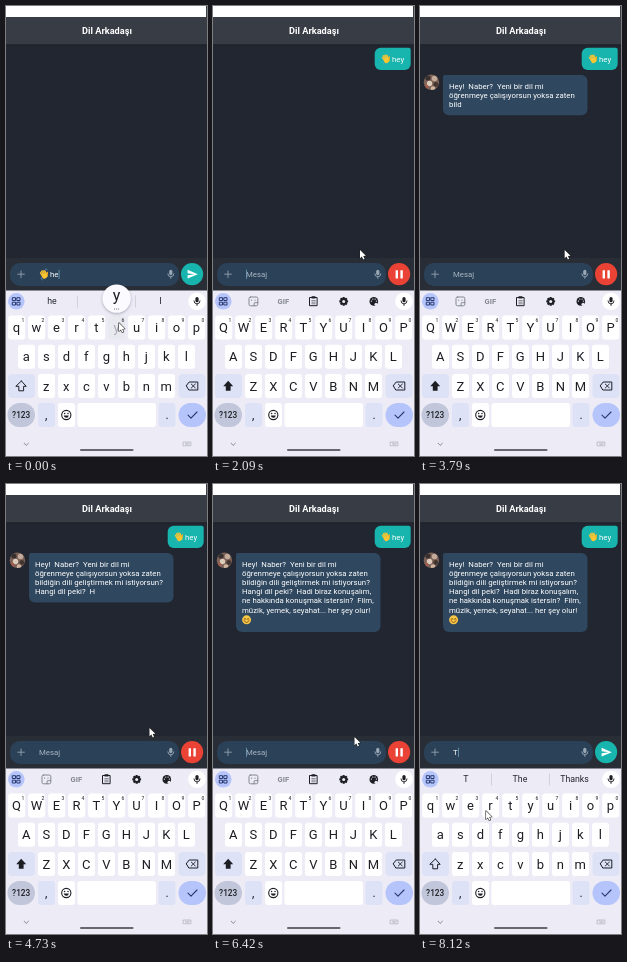
Recreate the animation shown at these times as an HTML page with a canvas. Size 201x450 px, loop 8.18 s.

```html
<!DOCTYPE html>
<html lang="tr">
<head>
<meta charset="utf-8">
<title>Dil Arkadaşı</title>
<style>
  html, body { margin: 0; width: 100%; height: 100%; overflow: hidden; background: #212630; }
  canvas { display: block; width: 201px; height: 450px; }
</style>
</head>
<body>
<canvas id="stage"></canvas>
<script>
const W = 201, H = 450, LOOP = 8180;
const canvas = document.getElementById('stage');
const c = canvas.getContext('2d');
const dpr = window.devicePixelRatio || 1;
canvas.width = Math.round(W * dpr);
canvas.height = Math.round(H * dpr);

const FONT = 'Roboto, "Noto Sans", sans-serif';
const BODY = 7.83, LINE = 9.17;
const TEAL = '#17b5ad', RED = '#ea4335', INK = '#1d1e24', LILAC = '#dee2f7', KEYS = '#edecf6';
const REPLY = 'Hey!  Naber?  Yeni bir dil mi öğrenmeye çalışıyorsun yoksa zaten ' +
  'bildiğin dili geliştirmek mi istiyorsun? Hangi dil peki?  Hadi biraz konuşalım, ' +
  'ne hakkında konuşmak istersin?  Film, müzik, yemek, seyahat... her şey olur! ☺';

// Moments of the conversation, in ms
const T = { yUp: 110, clear: 640, sent: 850, caps: 1180, reply: 2620, done: 6480, tDown: 7690, tUp: 7810 };

const POINTER = [
  [0, 113, 317], [180, 113, 317], [470, 184, 263], [600, 184, 263], [790, 148, 240],
  [1100, 147.5, 240], [1700, 147, 244], [3300, 147, 244], [4100, 143.5, 244], [4900, 143.5, 244],
  [5500, 141.5, 253], [6700, 141.5, 253], [7100, 160.5, 253], [7250, 160.5, 253],
  [7620, 91, 320], [7840, 91, 320], [8110, 66, 327], [LOOP, 66, 327]
];
const TYPED = [[T.reply, 0], [3000, 22.5], [4730, 124.4], [5760, 189.5], [6310, 224]];

const ease = u => u * u * (3 - 2 * u);

function track(keys, t, curve) {
  if (t <= keys[0][0]) return keys[0].slice(1);
  for (let i = 1; i < keys.length; i++) {
    const a = keys[i - 1], b = keys[i];
    if (t < b[0]) {
      const u = curve((t - a[0]) / (b[0] - a[0]));
      return a.slice(1).map((v, k) => v + (b[k + 1] - v) * u);
    }
  }
  return keys[keys.length - 1].slice(1);
}

function box(x, y, w, h, r, fill) {
  c.fillStyle = fill;
  c.beginPath();
  c.roundRect(x, y, w, h, r);
  c.fill();
}

function disc(x, y, r, fill) {
  c.fillStyle = fill;
  c.beginPath();
  c.arc(x, y, r, 0, Math.PI * 2);
  c.fill();
}

function ring(x, y, r, color, w) {
  c.strokeStyle = color;
  c.lineWidth = w;
  c.beginPath();
  c.arc(x, y, r, 0, Math.PI * 2);
  c.stroke();
}

function path(points, color, w, closed) {
  c.beginPath();
  for (let i = 0; i < points.length; i += 2) c.lineTo(points[i], points[i + 1]);
  if (closed) c.closePath();
  if (w) {
    c.strokeStyle = color;
    c.lineWidth = w;
    c.stroke();
  } else {
    c.fillStyle = color;
    c.fill();
  }
}

function at(x, y, draw) {
  c.save();
  c.translate(x, y);
  draw();
  c.restore();
}

// Laid out at 100px and scaled down, so advances are not rounded to pixels
function text(s, x, y, size, color, align = 'left', weight = 400) {
  at(x, y, () => {
    c.scale(size / 100, size / 100);
    c.font = `${weight} 100px ${FONT}`;
    c.textAlign = align;
    c.fillStyle = color;
    c.fillText(s, 0, 0);
  });
}

function textWidth(s) {
  c.font = `400 100px ${FONT}`;
  return c.measureText(s).width * BODY / 100;
}

function wave(x, y) {
  at(x, y, () => {
    c.rotate(-0.45);
    for (let i = 0; i < 4; i++) {
      path([-2 + i * 1.45, 1, -2.4 + i * 1.55, -3 - (i === 1 || i === 2 ? 0.9 : 0)], '#fcc531', 1.4);
    }
    path([2, 2.4, 4, -0.4], '#f3ab22', 1.4);
    box(-2.7, -0.8, 5.4, 4.8, 2, '#fcc531');
    path([-3.9, 1.5, -4.4, 3, -3.6, 4.3], '#5d9cc4', 0.6);
    path([3.4, -4.4, 4.7, -3.6, 5, -2.4], '#5d9cc4', 0.6);
  });
}

function smile(x, y) {
  disc(x, y, 4.5, '#f9c846');
  for (const s of [-1, 1]) {
    disc(x + s * 2.5, y + 1, 0.9, '#f09a4a');
    c.strokeStyle = '#6b4512';
    c.lineWidth = 0.7;
    c.beginPath();
    c.arc(x + s * 1.6, y - 0.5, 0.9, Math.PI, 0);
    c.stroke();
  }
  c.beginPath();
  c.arc(x, y + 0.7, 2, 0.2, Math.PI - 0.2);
  c.stroke();
}

function mic(x, y, color) {
  box(x - 1.6, y - 4.4, 3.2, 5.4, 1.6, color);
  c.strokeStyle = color;
  c.lineWidth = 0.9;
  c.beginPath();
  c.arc(x, y - 0.4, 3, 0, Math.PI);
  c.stroke();
  path([x, y + 2.5, x, y + 4.2], color, 0.9);
}

function wrap(s, max) {
  const lines = [];
  let line = null;
  for (const word of s.split(' ')) {
    const next = line === null ? word : line + ' ' + word;
    if (line !== null && textWidth(next.trimEnd()) > max) {
      lines.push(line);
      line = word;
    } else line = next;
  }
  lines.push(line);
  return lines;
}

function avatar() {
  c.save();
  c.beginPath();
  c.arc(11.4, 76.3, 7.7, 0, Math.PI * 2);
  c.clip();
  box(3, 68, 17, 17, 0, '#7d6258');
  disc(8, 72, 2.6, '#38302e');
  disc(14.5, 72.5, 2.8, '#c2ab9b');
  disc(9.5, 77.5, 2.7, '#dccabb');
  disc(15.8, 78.5, 2.4, '#43352f');
  disc(6, 81, 2.4, '#a05f4e');
  disc(13, 82.5, 2.3, '#d0b6a2');
  c.restore();
}

function chat(t) {
  box(0, 0, W, H, 0, '#212630');
  box(0, 0, W, 38.5, 0, '#373c45');
  box(0, 0, W - 1, 11, 0, '#ffffff');
  box(0, 38.5, W, 1, 0, '#1c2028');
  text('Dil Arkadaşı', 101, 28.4, 9.2, '#ffffff', 'center', 700);

  if (t >= T.sent) {
    box(161.7, 41.8, 36, 22.2, [6, 2, 6, 6], TEAL);
    wave(173, 53);
    text('hey', 179, 55.7, BODY, '#ffffff');
  }
  if (t >= T.reply) {
    avatar();
    const n = Math.floor(track(TYPED, t, u => u)[0]);
    const lines = wrap(REPLY.slice(0, n), 132.5);
    const w = lines.length > 1 ? 144.5 : textWidth(lines[0]) + 13;
    const h = 22 + (lines.length - 1) * LINE + (lines.length > 6 ? 2 : 0);
    box(23, 69, w, h, [2, 6, 6, 6], '#2f475f');
    lines.forEach((s, i) => {
      const y = 82.8 + i * LINE;
      if (s.startsWith('☺')) smile(33.6, y - 2);
      else text(s, 29, y, BODY, '#ffffff');
    });
  }
}

function composer(t) {
  box(0, 252, W, 33, 0, '#292e36');
  box(4, 257, 169, 23, 10, '#2a4158');
  path([11.6, 268.2, 18.4, 268.2], '#94a1ae', 0.9);
  path([15, 264.8, 15, 271.6], '#94a1ae', 0.9);
  mic(164.8, 268.2, '#9aa8b6');

  let caret = 33;
  if (t < T.clear) {
    const s = t < T.yUp ? 'he' : 'hey';
    wave(38, 268.5);
    text(s, 44, 271.2, BODY, '#ffffff');
    caret = 44.2 + textWidth(s);
  } else if (t < T.tUp) {
    text('Mesaj', 33, 271.2, BODY, '#a9b6c3');
  } else {
    text('T', 33, 271.2, BODY, '#ffffff');
    caret = 33.3 + textWidth('T');
  }
  if (t % 1000 < 500) box(caret, 263.7, 0.8, 9.2, 0, '#6f9dbd');

  if (t >= T.clear && t < T.done) {
    disc(186.1, 268.1, 11.1, RED);
    box(182.6, 264.2, 2.4, 8.2, 0.3, '#ffffff');
    box(187.4, 264.2, 2.4, 8.2, 0.3, '#ffffff');
  } else {
    disc(186.1, 268.1, 11.1, TEAL);
    path([181.6, 263.8, 191.8, 268.2, 181.6, 272.6, 181.6, 269.2, 188.3, 268.2, 181.6, 267.2], '#ffffff', 0, true);
  }
}

function suggestions(words) {
  words.forEach((w, i) => {
    const x = [46, 100, 154.5][i];
    if (w === 'wave') wave(x, 295.5);
    else text(w, x, 298.4, 8.8, '#24252b', 'center');
  });
  for (const x of [71, 129]) box(x, 289.5, 0.7, 12, 0, '#c5c6d0');
}

function tools() {
  const gray = '#84868f';
  // sticker
  c.strokeStyle = gray;
  c.lineWidth = 1;
  c.beginPath();
  c.roundRect(36, 291, 8.8, 8.8, 1.5);
  c.stroke();
  path([44.8, 296.5, 41.2, 296.8, 41, 299.8], gray, 0.9);
  disc(38.6, 294.2, 0.6, gray);
  disc(42, 294.2, 0.6, gray);
  text('GIF', 70.3, 298, 7.6, gray, 'center', 600);
  // clipboard
  c.strokeStyle = INK;
  c.lineWidth = 1;
  c.strokeRect(96.9, 291.5, 7.2, 8.2);
  box(98.5, 290.2, 4, 2.4, 0.5, INK);
  for (const y of [294.6, 296.2, 297.8]) path([98.7, y, 102.3, y], INK, 0.5);
  // gear
  at(130.7, 295.4, () => {
    for (let i = 0; i < 4; i++) {
      box(-1.1, -4.4, 2.2, 8.8, 0.4, INK);
      c.rotate(Math.PI / 4);
    }
  });
  disc(130.7, 295.4, 3.3, INK);
  disc(130.7, 295.4, 1.5, KEYS);
  // palette
  disc(160.8, 295.4, 4.3, INK);
  for (const [x, y] of [[-2.4, -0.3], [-1, -2.3], [1.3, -2.3], [2.6, -0.3]]) {
    disc(160.8 + x, 295.4 + y, 0.7, KEYS);
  }
  disc(163, 298.3, 1.5, KEYS);
}

function letters(row, x0, y, caps, pressed) {
  [...row].forEach((ch, i) => {
    const x = x0 + i * 20, down = ch === pressed;
    box(x - 8.5, y - 12, 17, 24, 3, down ? '#e9e9f0' : '#ffffff');
    text(caps ? ch.toUpperCase() : ch, x - 0.2, y + 4.6, 13, down ? '#a9abb5' : INK, 'center');
    if (row.length === 10) text((i + 1) % 10, x + 6.3, y - 6, 5, '#45464e', 'center', 500);
  });
}

function bottomRows(caps) {
  // shift and backspace
  box(2, 368, 27, 24, 4, LILAC);
  const arrow = [15.2, 374.8, 20.2, 380.3, 17.6, 380.3, 17.6, 384.8, 12.8, 384.8, 12.8, 380.3, 10.2, 380.3];
  path(arrow, INK, caps ? 0 : 1, true);
  box(172.5, 368, 27, 24, 4, LILAC);
  path([180, 380, 183.2, 376, 191.8, 376, 191.8, 384, 183.2, 384], INK, 1, true);
  path([185.3, 378, 189.3, 382], INK, 0.9);
  path([189.3, 378, 185.3, 382], INK, 0.9);

  box(1.5, 397, 27.5, 24, 12, '#c1c6da');
  text('?123', 15.2, 412, 8.3, INK, 'center', 500);
  box(32, 397, 17, 24, 3, LILAC);
  text(',', 40.3, 413, 12, INK, 'center');
  box(52, 397, 17, 24, 3, '#ffffff');
  ring(60.3, 409, 4.6, INK, 1.1);
  disc(58.6, 407.6, 0.75, INK);
  disc(62, 407.6, 0.75, INK);
  c.beginPath();
  c.arc(60.3, 409.3, 2.5, 0.1, Math.PI - 0.1);
  c.fill();
  box(71.5, 397, 78.5, 24, 3, '#ffffff');
  box(152.5, 397, 17, 24, 3, LILAC);
  text('.', 161, 413, 12, INK, 'center');
  box(172.5, 397, 27.5, 24, 12, '#b5c4fa');
  path([182, 409.2, 185, 412.2, 191, 406], '#293a72', 1.1);
}

function keyboard(t) {
  const caps = t >= T.caps && t < T.tUp;
  const pressed = t < T.yUp ? 'y' : t >= T.tDown && t < T.tUp ? 't' : '';
  box(0, 284.5, W, H - 284.5, 0, KEYS);

  disc(10.3, 295.3, 8.3, '#b5c4fa');
  c.strokeStyle = '#293a72';
  c.lineWidth = 1;
  for (const x of [6.7, 11.2]) for (const y of [291.7, 296.2]) c.strokeRect(x, y, 2.8, 2.8);
  disc(191, 295.3, 8.8, '#ffffff');
  mic(191, 295.3, INK);

  if (t < T.yUp) suggestions(['he', '', 'I']);
  else if (t < T.caps) suggestions(['hey', '', 'wave']);
  else if (t < T.tUp) tools();
  else suggestions(['T', 'The', 'Thanks']);

  letters('qwertyuiop', 10.7, 321.5, caps, pressed);
  letters('asdfghjkl', 20.5, 350.8, caps, pressed);
  letters('zxcvbnm', 40.5, 380, caps, pressed);
  bottomRows(caps);

  path([18, 437.2, 20.2, 439.4, 22.4, 437.2], '#6b6c74', 0.8);
  box(74, 443.2, 53.5, 1.6, 0.8, '#3c3d44');
  c.strokeStyle = '#a2a3ab';
  c.lineWidth = 0.6;
  c.strokeRect(177.5, 436, 7.4, 3.8);
  path([179, 437.3, 183.5, 437.3], '#a2a3ab', 0.5);
  path([179.8, 438.6, 182.7, 438.6], '#a2a3ab', 0.5);

  if (pressed) {
    const x = pressed === 'y' ? 110.6 : 90.7;
    c.save();
    c.shadowColor = 'rgba(40,40,70,.35)';
    c.shadowBlur = 3 * dpr;
    c.shadowOffsetY = dpr;
    disc(x, 292.6, 14.2, '#fbfbff');
    c.restore();
    text(caps ? pressed.toUpperCase() : pressed, x, 295.2, 16, INK, 'center');
    for (const d of [-2, 0, 2]) disc(x + d, 303, 0.55, '#55565e');
  }
}

function pointer(t) {
  const [x, y] = track(POINTER, t, ease);
  at(x, y, () => {
    const arrow = [0, 0, 0, 8.2, 1.9, 6.5, 3.2, 9.4, 4.5, 8.8, 3.2, 6, 5.8, 5.8];
    path(arrow, '#202020', 1.1, true);
    path(arrow, '#ffffff', 0, true);
  });
}

function render(t) {
  c.setTransform(dpr, 0, 0, dpr, 0, 0);
  c.lineJoin = c.lineCap = 'round';
  chat(t);
  composer(t);
  keyboard(t);
  pointer(t);
}

let start = null;
function frame(now) {
  if (start === null) start = now;
  render((now - start) % LOOP);
  requestAnimationFrame(frame);
}
render(0);
requestAnimationFrame(frame);
</script>
</body>
</html>
```
